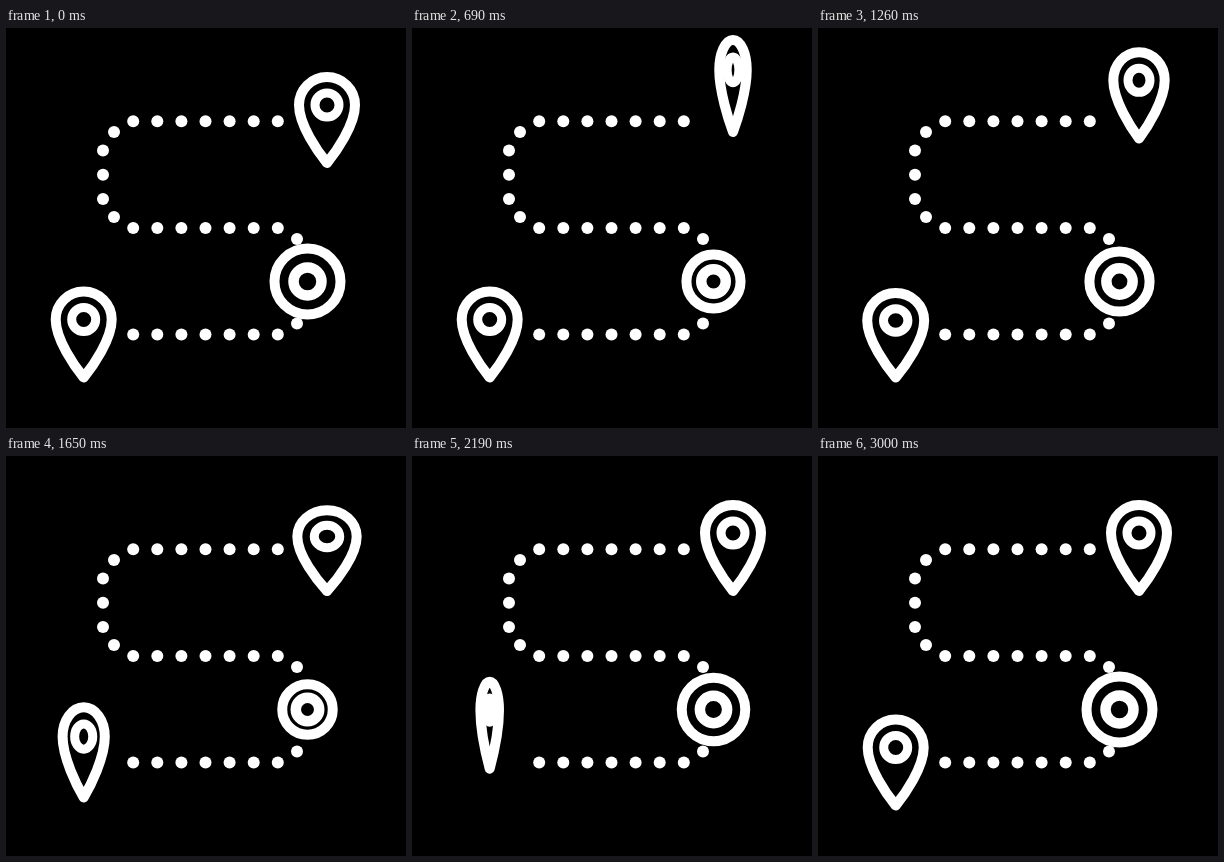
Recreate the animation shown at these times as an HTML page with a canvas. Size 400 by 400 pixels, loop 3.09 s.

```html
<!DOCTYPE html>
<html>
<head>
<meta charset="utf-8">
<style>
html, body { margin: 0; width: 100%; height: 100%; overflow: hidden; background: #000; }
canvas { display: block; width: 400px; height: 400px; }
</style>
</head>
<body>
<canvas id="stage" width="400" height="400"></canvas>
<script>
const ctx = document.getElementById('stage').getContext('2d');
const LOOP = 3090, STEP = 30, END = 3000;
const clamp = v => Math.min(1, Math.max(0, v));
const ease = p => (1 - Math.cos(Math.PI * clamp(p))) / 2;

// Vertical squash and stretch of a hopping pin: [time, scale]
const STRETCH = [[0, 1], [210, .91], [560, 1.09], [960, 1.01], [1440, 1], [1575, .92], [1800, 1]];

function stretchAt(t) {
  if (t <= 0) return 1;
  for (let i = 1; i < STRETCH.length; i++) {
    const [t0, a] = STRETCH[i - 1], [t1, b] = STRETCH[i];
    if (t < t1) return a + (b - a) * ease((t - t0) / (t1 - t0));
  }
  return 1;
}

function riseAt(t) {
  const start = 397, apex = 960, land = 1476, height = 37;
  if (t < start || t > land) return 0;
  return t < apex
    ? height * (1 - ((apex - t) / (apex - start)) ** 2.48)
    : height * (1 - ((t - apex) / (land - apex)) ** 2);
}

// The path is scaled, the line width is not.
function strokeScaled(x, y, sx, sy, width, trace) {
  ctx.save();
  ctx.translate(x, y);
  ctx.scale(sx, sy);
  ctx.beginPath();
  trace();
  ctx.restore();
  ctx.lineWidth = width;
  ctx.stroke();
}

function pin(x, tipY, t) {
  const sy = stretchAt(t);
  const turn = 2 * Math.PI * ease((t - 180) / 1290);
  const cos = Math.cos(turn) * (2 - sy);
  const sx = Math.abs(cos) < .01 ? .01 : cos;
  const y = tipY - riseAt(t);
  strokeScaled(x, y, sx, sy, 10, () => {
    ctx.moveTo(0, 0);
    ctx.bezierCurveTo(-9, -11, -28, -38, -28, -58);
    ctx.arc(0, -58, 28, Math.PI, 2 * Math.PI);
    ctx.bezierCurveTo(28, -38, 9, -11, 0, 0);
    ctx.closePath();
  });
  strokeScaled(x, y, sx, sy, 9, () => ctx.arc(0, -58, 12, 0, 2 * Math.PI));
}

function ring(r, width) {
  strokeScaled(301.5, 253.5, 1, 1, width, () => ctx.arc(0, 0, r, 0, 2 * Math.PI));
}

function target(t) {
  const u = t % 1000 / 500;
  const shrink = u < 1 ? u ** 2.7 : (2 - u) ** 2.2;
  ring(33 - 17 * shrink, 10);
  ring(14 - 5 * shrink, 10.5);
}

function dot(x, y) {
  ctx.beginPath();
  ctx.arc(x, y, 6, 0, 2 * Math.PI);
  ctx.fill();
}

function trail() {
  for (const y of [93.3, 200, 306.5])
    for (let i = 0; i < 7; i++) dot(127.2 + i * 24.1, y);
  const bends = [[108, 104], [97, 122.5], [97, 146.8], [97, 171], [108, 189], [291, 211], [291, 295.5]];
  for (const [x, y] of bends) dot(x, y);
}

const begin = performance.now();

function draw(now) {
  const elapsed = Math.max(0, now - begin) % LOOP;
  const t = Math.min(END, Math.floor(elapsed / STEP) * STEP);
  ctx.fillStyle = '#000';
  ctx.fillRect(0, 0, 400, 400);
  ctx.fillStyle = ctx.strokeStyle = '#fff';
  ctx.lineJoin = 'round';
  trail();
  target(t);
  pin(321, 135, t);
  pin(77.7, 349.5, t - 1200);
  requestAnimationFrame(draw);
}
draw(begin);
</script>
</body>
</html>
```
